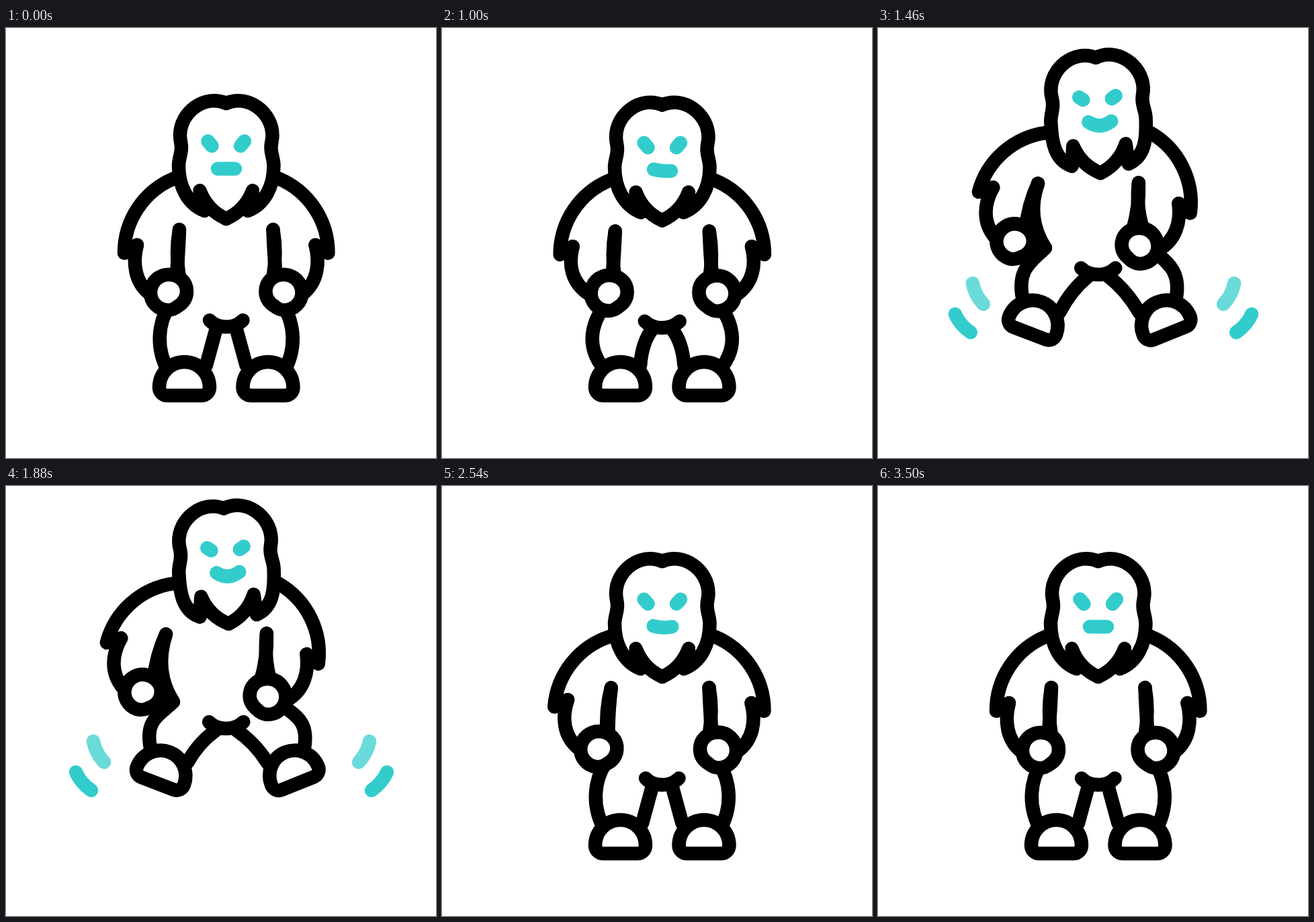
These frames come from a looping animation (640 px wide and 640 px high, 3.6 s). An HTML page with a canvas:

```html
<!DOCTYPE html>
<html lang="en">
<head>
<meta charset="utf-8">
<title>Jumping yeti</title>
<style>
  html, body { margin: 0; width: 100%; height: 100%; overflow: hidden; background: #fff; }
  canvas { display: block; width: 100vmin; height: 100vmin; }
</style>
</head>
<body>
<canvas width="640" height="640"></canvas>
<script>
const LOOP = 3600;
const TEAL = '#33cccc';
const MIRROR = 655.5;
const ctx = document.querySelector('canvas').getContext('2d');

const FOOT = 'M-26,25 H26 A11.5,12 0 0 0 37.5,13 A37.5,38 0 0 0 -37.5,13 A11.5,12 0 0 0 -26,25Z';
const FIST = 'M242,367 C258,367 269,378 269,392 C269,402 264,409 256,414 C250,419 246,420 240,420 ' +
  'C226,419 215,408 215,394 C215,379 227,367 242,367Z';
const UPPER_ARM = 'M250,224 A120,120 0 0 0 176,335 L195,323';
const ARM_PIT = 'M258,300 Q252,335 258,372';

const linear = (t, from, to) => Math.min(1, Math.max(0, (t - from) / (to - from)));

function ramp(t, from, to) {
  const u = linear(t, from, to);
  return u * u * (3 - 2 * u);
}

// Eases in, holds, eases out
const pulse = (t, a, b, c, d) => ramp(t, a, b) * (1 - ramp(t, c, d));

// Crouch, leap with a slow upward drift, drop, then let the arms settle
function poseAt(t) {
  const crouch = pulse(t, 0, 560, 560, 1200);
  const lift = pulse(t, 1100, 1480, 2050, 2520);
  const drift = linear(t, 1440, 2050);
  const settle = pulse(t, 1100, 1460, 2800, 3400);
  const bent = Math.sqrt(crouch);
  const splay = lift ** .65;
  return {
    bodyY: 10.5 * crouch - (68 + 15 * drift) * lift,
    hipY: 6.5 * crouch - (78 + 8 * drift) * lift,
    footY: -(91 + 16 * drift) * lift,
    bend: bent + .35 * lift,
    tilt: -2.4 * splay,
    spread: 10 * splay - 3 * crouch,
    smile: pulse(t, 1050, 1460, 2050, 2750),
    smirk: pulse(t, 0, 400, 700, 1400) + .6 * pulse(t, 2400, 2700, 2750, 3400),
    left: {
      swing: 15 * ramp(t, 1050, 1460) * (1 - linear(t, 2020, 3200)) ** 2 + .8 * crouch,
      reach: 15 * bent + 5 * settle,
      footX: -31 * splay,
      footTurn: 21 * splay
    },
    right: {
      swing: crouch - 7.3 * pulse(t, 1100, 1460, 1900, 2300),
      reach: 10 * bent + 2.5 * settle,
      footX: -35 * splay,
      footTurn: 22 * splay
    }
  };
}

const rad = deg => deg * Math.PI / 180;

function turn(x, y, deg) {
  const c = Math.cos(rad(deg)), s = Math.sin(rad(deg));
  return [x * c - y * s, x * s + y * c];
}

function rotateAt(x, y, deg) {
  ctx.translate(x, y);
  ctx.rotate(rad(deg));
  ctx.translate(-x, -y);
}

function group(draw) {
  ctx.save();
  draw();
  ctx.restore();
}

function mirrored(width, draw) {
  group(() => {
    ctx.transform(-1, 0, 0, 1, width, 0);
    draw();
  });
}

function line(d, fill) {
  const path = new Path2D(d);
  if (fill) {
    ctx.fillStyle = fill;
    ctx.fill(path);
  }
  ctx.stroke(path);
}

function leg(pose, side) {
  const b = pose.bend, hip = 405 + pose.hipY, top = hip + 42;
  const fx = 265.5 + side.footX, fy = 522 + pose.footY;
  const at = (x, y) => {
    const [dx, dy] = turn(x, y, side.footTurn);
    return [fx + dx, fy + dy];
  };
  line(`M249,${hip} C${232 - 7 * b},${hip + 20} ${at(-45.5 - 20 * b, -60 + 5 * b)} ${at(-28.5, -20)}`);

  const [ex, ey] = at(32.5 - 6 * b, -20);
  line(`M313,${top} Q${(313 + ex) / 2 - 13 * b},${(top + ey) / 2 - 17 * b} ${ex},${ey}`);

  group(() => {
    ctx.translate(fx, fy);
    ctx.rotate(rad(side.footTurn));
    line(FOOT, '#fff');
  });
}

function arm(pose, side) {
  const { swing, reach } = side;
  const y = pose.bodyY, hip = 405 + pose.hipY, raise = reach / 5;
  const [px, py] = turn(8, 76, swing);
  line(`M${250 + px},${224 + y + py} Q${256 - 2.4 * swing},${hip - 45} 249,${hip}`);

  group(() => {
    ctx.translate(0, y);
    rotateAt(250, 224, swing);
    line(UPPER_ARM);
    line(ARM_PIT);
    line(`M195,323 C188,350 ${192 + reach / 5},${378 - raise} ${213 + reach * .8},${395 - raise}`);
    ctx.translate(reach, -raise);
    line(FIST, '#fff');
  });
}

function head(pose) {
  const { smile: s, smirk: k } = pose;
  const tip = 295.5 - pose.spread, mouth = 209.5 - 2 * s;
  const half = () => line(`M327.75,112 C296,98 259,125 259,160 C259,168 261,170 261,178
    C261,188 257,195 257,205 C257,236 ${tip - 25},262 ${tip},272
    L288.5,242 C296,262 310,276 327.75,284`);
  const eye = () => line(`M300.5,${168.5 + 1.5 * s} L306.5,${175.5 - 1.5 * s}`);

  group(() => {
    ctx.translate(0, pose.bodyY);
    rotateAt(327.75, 200, pose.tilt);
    half();
    mirrored(MIRROR, half);
    ctx.strokeStyle = TEAL;
    eye();
    mirrored(MIRROR, eye);
    line(`M${315 - 2 * s},${mouth - 2.5 * k}
      Q${327.5 + 2 * (s - k)},${mouth + 2.5 * k + 12 * s} ${341 + 6 * s},${mouth + 1.5 * k}`);
  });
}

function streaks(t) {
  const fade = pulse(t, 1200, 1320, 1980, 2170);
  if (!fade) return;
  const size = pulse(t, 1200, 1440, 1850, 2170);
  ctx.strokeStyle = TEAL;
  ctx.translate(14 * (1 - ramp(t, 1200, 1460)) - 12 * ramp(t, 1380, 1800), 0);
  ctx.setLineDash([Math.max(.1, 38 * size), 100]);
  ctx.globalAlpha = fade;
  line('M139,453 Q123,442 116,426');
  ctx.globalAlpha = .72 * fade;
  line('M158,411 Q145,397 142,380');
}

function frame(t) {
  const pose = poseAt(t);
  ctx.fillStyle = '#fff';
  ctx.fillRect(0, 0, 640, 640);
  ctx.lineWidth = 20.5;
  ctx.lineCap = ctx.lineJoin = 'round';
  ctx.strokeStyle = '#000';

  const y = 435 + pose.hipY, wide = 2.5 * pose.bend;
  leg(pose, pose.left);
  mirrored(MIRROR, () => leg(pose, pose.right));
  line(`M${303 - wide},${y} C315,${y + 13} 340,${y + 13} ${352.5 + wide},${y}`);
  arm(pose, pose.left);
  mirrored(MIRROR, () => arm(pose, pose.right));
  head(pose);
  group(() => streaks(t));
  mirrored(671, () => streaks(t));
}

const start = performance.now();
function tick() {
  frame((performance.now() - start) % LOOP);
  requestAnimationFrame(tick);
}
tick();
</script>
</body>
</html>
```
